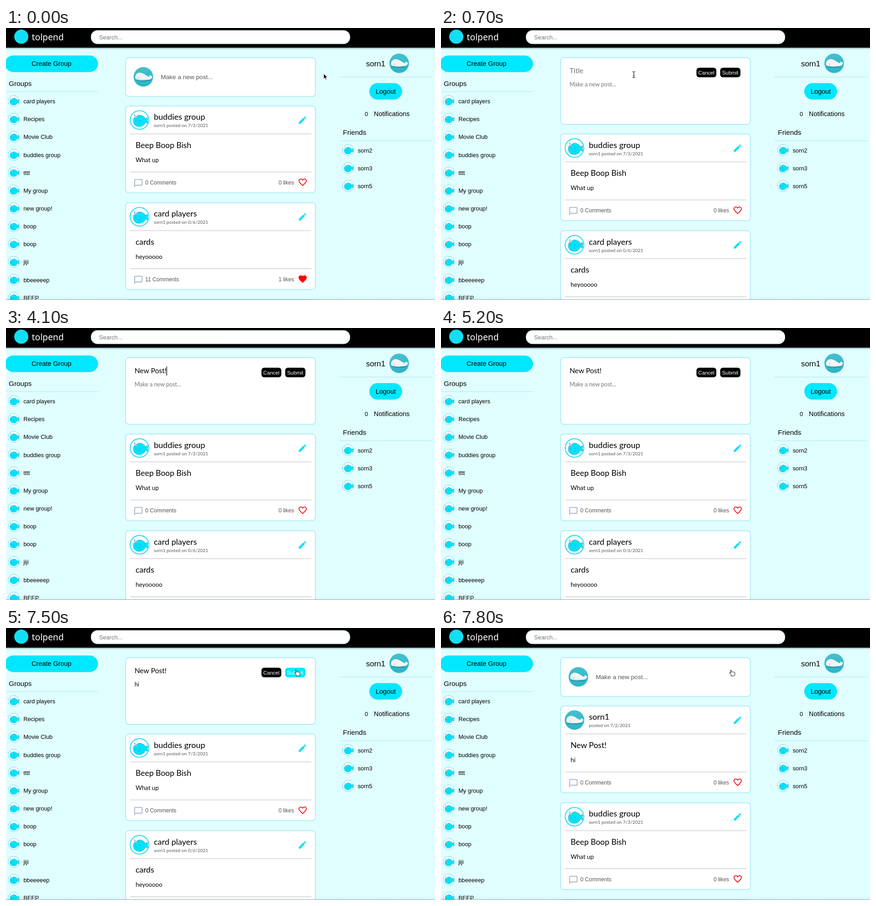
An HTML page for the animation above (9500 ms loop, 940 px wide and 596 px high).

```html
<!DOCTYPE html>
<html lang="en">
<head>
<meta charset="utf-8">
<title>Group feed</title>
<style>
html, body { margin: 0; width: 100%; height: 100%; overflow: hidden; background: #e0feff; }
svg { display: block; width: 940px; height: 596px; }
text { font-family: "Liberation Sans", Arial, sans-serif; white-space: pre; }
.soft { font-family: Lato, "Open Sans", sans-serif; }
.brand { font-family: "Noto Sans", sans-serif; }
</style>
</head>
<body>
<svg id="stage" viewBox="0 0 940 596" xmlns="http://www.w3.org/2000/svg"></svg>
<script>
const LOOP = 9500, STEP = 100, SHIFT = 61.3;
const OPEN_AT = 700, POST_AT = 7800;
const CYAN = '#00e8ff', PALE = '#aee6ef';
const stage = document.getElementById('stage');

const text = (x, y, size, str, fill = '#000', extra = '') =>
  `<text x="${x}" y="${y}" font-size="${size}" fill="${fill}" ${extra}>${str}</text>`;
const soft = (x, y, size, str, fill = '#000', id = '') =>
  text(x, y, size, str, fill, `class="soft" ${id && `id="${id}"`}`);
const box = (x, y, w, h, r, fill, extra = '') =>
  `<rect x="${x}" y="${y}" width="${w}" height="${h}" rx="${r}" fill="${fill}" ${extra}/>`;
const rule = (x1, x2, y, color) =>
  `<path d="M${x1} ${y}H${x2}" stroke="${color}" fill="none"/>`;
const use = (id, x, y, scale = 1) =>
  `<use href="#${id}" transform="translate(${x} ${y}) scale(${scale})"/>`;
const ring = (x, y, r, width, color) =>
  `<circle cx="${x}" cy="${y}" r="${r}" fill="#fff" stroke="${color}" stroke-width="${width}"/>`;
const panel = (y, h) =>
  box(262, y, 416, h, 7, '#fff', 'stroke="#b2edf5" stroke-width="2"');
const pill = (x, y, w, h) =>
  box(x, y, w, h, h / 2, CYAN, 'stroke="#22d3e7" stroke-width=".6"');

const defs = `<defs>
  <linearGradient id="sea" x2="0" y2="1">
    <stop stop-color="#45c0ce"/><stop offset="1" stop-color="#2db4c6"/>
  </linearGradient>
  <linearGradient id="shade" x2="0" y2="1">
    <stop stop-color="#5d7778" stop-opacity="0"/><stop offset="1" stop-color="#5d7778" stop-opacity=".5"/>
  </linearGradient>
  <g id="narwhal" stroke="#3a8b9b" stroke-width=".7" stroke-linejoin="round">
    <path d="M-13.500 2C-13.500-4-11-6-7-7C-4-11 2-12 6-9C10-8 12-5 13-2.500L17-5.500C18.500-3 18.500-1 17 1.200C18.500 3.500 18.500 5.500 17 7.500L13 4.500C11 11 6 14.500 0 14.500C-8 14.500-13.500 10-13.500 2Z"
      fill="#02e3fb"/>
    <path d="M-8.500-3.500L-12-12L-5-6Z" fill="#ece6e6"/>
    <path d="M-3 6q2 2 5 1" fill="none"/>
    <circle cx="-8" cy="2" r=".6" fill="#123"/><circle cx="1" cy="1" r=".6" fill="#123"/>
  </g>
  <g id="whale">
    <circle r="21.4" fill="url(#sea)"/>
    <ellipse cx="0" cy="7.500" rx="16" ry="2.500" fill="#2799aa"/>
    <path d="M-18 2C-18-6-12-10-6-9C2-8 7-1 13 0C13-3 14-4 16-3.500C17-2 18-1.500 19.500-1C19 3 16 6 10 6.500C2 8-18 8-18 2Z" fill="#f1f5f6"/>
    <path d="M-17 4C-10 6 2 6.500 10 5.500C3 8.500-15 8.500-17 4Z" fill="#cbd9dd"/>
    <circle cx="-10" cy="2" r=".7" fill="#345"/>
  </g>
  <path id="pencil" fill="#10dff5" d="M3 17.250V21h3.750L17.810 9.940l-3.750-3.750L3 17.250zM20.710 7.040c.39-.39.39-1.020 0-1.410l-2.340-2.340c-.39-.39-1.020-.39-1.410 0l-1.830 1.830 3.750 3.750 1.830-1.830z"/>
  <path id="bubble" fill="#a3b4c6" d="M20 2H4c-1.100 0-2 .9-2 2v18l4-4h14c1.100 0 2-.9 2-2V4c0-1.100-.9-2-2-2zm0 14H6l-2 2V4h16v12z"/>
  <path id="liked" fill="#f00" d="M12 21.350l-1.450-1.320C5.400 15.360 2 12.280 2 8.500 2 5.420 4.420 3 7.500 3c1.740 0 3.410.81 4.500 2.090C13.090 3.810 14.760 3 16.500 3 19.580 3 22 5.420 22 8.500c0 3.780-3.400 6.860-8.550 11.540L12 21.350z"/>
  <path id="heart" fill="none" stroke="#e3121c" stroke-width="2" d="M12 20L10.550 18.700C6 14.600 3 11.900 3 8.500C3 6 5 4 7.500 4C9.200 4 11 5 12 6.700C13 5 14.800 4 16.500 4C19 4 21 6 21 8.500C21 11.900 18 14.600 13.450 18.700Z"/>
  <path id="arrow" d="M0 0V11.500L2.700 9L4.600 13.300L6.600 12.400L4.800 8.300H8.300Z" fill="#000" stroke="#fff" stroke-width=".9"/>
  <path id="beam" d="M-3-6.500Q0-6.500 0-4.500Q0-6.500 3-6.500M0-4.500V4.500M-3 6.500Q0 6.500 0 4.500Q0 6.500 3 6.500M-1.500 1.500H1.500" fill="none" stroke="#111" stroke-width="1.1"/>
  <path id="hand" d="M-2 7V5L-5.500.8Q-6-.8-4.200-.5L-2.600.8L-4-5Q-3.500-7-2-5.500L-.8-1.500Q.5-2.800 1.600-1.500Q3-2.400 3.800-1Q6-1.400 6 .8V4L4.800 7Z" fill="#fff" stroke="#111" stroke-width="1"/>
</defs>`;

const groups = ['card players', 'Recipes', 'Movie Club', 'buddies group', 'tttt', 'My group',
  'new group!', 'boop', 'boop', 'jiji', 'bbeeeeep', 'BEEP'];
const friends = ['sorn2', 'sorn3', 'sorn5'];
const listItem = (name, x, y) =>
  ring(x, y, 12.2, 1, '#62dcec') + use('narwhal', x, y, .62) + text(x + 21.2, y + 5, 12.8, name);

const sides =
  pill(-2, 60.6, 203.4, 35.6) + text(56, 83, 14.4, 'Create Group') +
  text(6, 127, 15.3, 'Groups') + rule(0, 202, 139.5, PALE) +
  groups.map((g, i) => listItem(g, 17, 160.2 + 39.14 * i)).join('') +
  text(789, 83.5, 16.8, 'sorn1') + use('whale', 861.5, 77.3) +
  rule(730, 934, 107.5, PALE) +
  pill(796.3, 121, 71.4, 35.6) + text(810, 143.5, 14.4, 'Logout') +
  text(786, 193, 12.8, '0') + text(806, 193.3, 14.4, 'Notifications') +
  text(738.3, 234.3, 15.3, 'Friends') + rule(730, 934, 247, PALE) +
  friends.map((f, i) => listItem(f, 749.5, 267.5 + 39.14 * i)).join('');

const header =
  [4.5, 3, 2].map(h => box(0, 42, 940, h, 0, '#456', 'opacity=".18"')).join('') +
  box(0, 0, 940, 43, 0, '#000') +
  '<circle cx="33.500" cy="19" r="15.500" fill="#12dff3"/>' +
  text(56.5, 27, 19.3, 'tolpend', '#fff', 'class="brand"') +
  box(186.3, 5.2, 567.4, 29.6, 14, '#fff', 'stroke="#b5eef4" stroke-width=".8"') +
  text(204, 24.8, 12.8, 'Search...', '#757575');

const avatar = (whale, x, y) => whale
  ? use('whale', x, y)
  : ring(x, y, 20.4, 1.8, '#10d9ef') + use('narwhal', x, y);

const card = (post, i) => {
  const grey = '#b9bcc0';
  return `<g transform="translate(0 ${171 + 212 * i})">` + panel(0, 190) +
    avatar(post.whale, 292.5, 30.6) +
    soft(324, 30.3, 18, post.name) + soft(324, 46.3, 10.1, post.sub, '#555') +
    use('pencil', 638.8, 20.2, .9) + rule(271.5, 669, 61, grey) +
    soft(284, 91.5, 17.5, post.title) + soft(284, 123, 13.3, post.body) +
    rule(271.5, 669, 144.5, grey) +
    use('bubble', 279.2, 158.2, .9) + text(305.3, 171.5, 12, post.comments + ' Comments', '#555') +
    text(597.2, 171.5, 12, post.likes + ' likes', '#555') +
    use(post.likes ? 'liked' : 'heart', 639.2, 156.2, .9) + '</g>';
};
const fresh = { whale: true, name: 'sorn1', sub: 'posted on 7/2/2021', title: 'New Post!', body: 'hi', comments: 0, likes: 0 };
const buddies = { name: 'buddies group', sub: 'sorn1 posted on 7/3/2021', title: 'Beep Boop Bish', body: 'What up', comments: 0, likes: 0 };
const players = { name: 'card players', sub: 'sorn1 posted on 0/6/2021', title: 'cards', body: 'heyooooo', comments: 11, likes: 1 };

const closedForm = panel(65, 85) + avatar(true, 301, 107) + text(339.2, 111.5, 13.6, 'Make a new post...', '#555');
const openForm = panel(65, 146) +
  soft(281.7, 99, 15.6, '', '#000', 'title') + soft(281.7, 128, 12.5, '', '#000', 'body') +
  box(559.7, 87, 43.6, 21, 6, '#000', 'id="cancel"') + text(563.7, 101.5, 11.4, 'Cancel', '#fff') +
  box(611.7, 87, 44.4, 21, 6, '#000', 'id="submit"') + text(616, 101.5, 11.4, 'Submit', '#fff') +
  '<path id="caret" stroke="#000" stroke-width="1.2"/>';

stage.innerHTML = defs + box(0, 0, 940, 596, 0, '#e0feff') + sides +
  `<g id="feed">${[buddies, players, fresh].map(card).join('')}</g>
   <g id="newFeed">${[fresh, buddies, players].map(card).join('')}</g>
   <g id="closed">${closedForm}</g><g id="open">${openForm}</g>` +
  header + box(0, 588, 940, 8, 0, 'url(#shade)', 'opacity=".15"') +
  rule(0, 940, 595.5, '#8fa9ab') + '<use id="cursor"/>';

const el = {};
stage.querySelectorAll('[id]').forEach(n => el[n.id] = n);
const show = (node, on) => node.setAttribute('display', on ? 'inline' : 'none');
const between = (t, a, b) => t >= a && t < b;
const mix = (a, b, k) => a + (b - a) * k;
const ease = (t, a, b) => {
  const k = Math.min(1, Math.max(0, (t - a) / (b - a)));
  return k * k * (3 - 2 * k);
};

const titleKeys = [2100, 2200, 2300, 2500, 2600, 2800, 3000, 3200, 3300];
const bodyKeys = [6100, 6200];
const typed = (str, keys, t) => str.slice(0, keys.filter(k => t >= k).length);

function setField(node, value, hint) {
  node.textContent = value || hint;
  node.setAttribute('fill', value ? '#000' : '#757575');
}

function setCaret(t, title, body) {
  const inTitle = between(t, 800, 1100) || between(t, 1600, 4200);
  const inBody = between(t, 4200, 5200) || between(t, 6100, 6500);
  show(el.caret, inTitle || inBody);
  const node = inTitle ? el.title : el.body;
  const value = inTitle ? title : body;
  const x = 282.2 + (value ? node.getComputedTextLength() : 0);
  el.caret.setAttribute('d', `M${x} ${inTitle ? '84V104.500' : '117V131.500'}`);
}

function pointer(t) {
  if (t < 6000) {
    const k = ease(t, 0, 600);
    return [mix(696, 422.5, k), mix(100, 102, k)];
  }
  if (t < 6900) return [mix(416, 440, ease(t, 6300, 6500)), 99];
  const k = ease(t, 6900, 7500);
  return [mix(440, 638, k), mix(99, 98, k)];
}

function draw(time) {
  const t = Math.floor((time % LOOP) / STEP) * STEP;
  const open = between(t, OPEN_AT, POST_AT), posted = t >= POST_AT;
  show(el.open, open);
  show(el.closed, !open);
  show(el.feed, !posted);
  show(el.newFeed, posted);
  el.feed.setAttribute('transform', `translate(0 ${open ? SHIFT : 0})`);

  const title = typed('New Post!', titleKeys, t), body = typed('hi', bodyKeys, t);
  setField(el.title, title, 'Title');
  setField(el.body, body, 'Make a new post...');
  setCaret(t, title, body);

  const [x, y] = pointer(t);
  const onCancel = open && between(x, 560, 604), onSubmit = open && between(x, 612, 656);
  el.cancel.setAttribute('fill', onCancel ? CYAN : '#000');
  el.submit.setAttribute('fill', onSubmit ? CYAN : '#000');

  const shape = x > 678 ? 'arrow' : !open || onCancel || onSubmit ? 'hand' : x > 540 ? 'arrow' : 'beam';
  el.cursor.setAttribute('href', '#' + shape);
  el.cursor.setAttribute('transform', `translate(${x} ${y})`);
  show(el.cursor, !between(t, 2100, 6200));
}

const start = performance.now();
function tick() {
  draw(performance.now() - start);
  requestAnimationFrame(tick);
}
tick();
</script>
</body>
</html>
```
